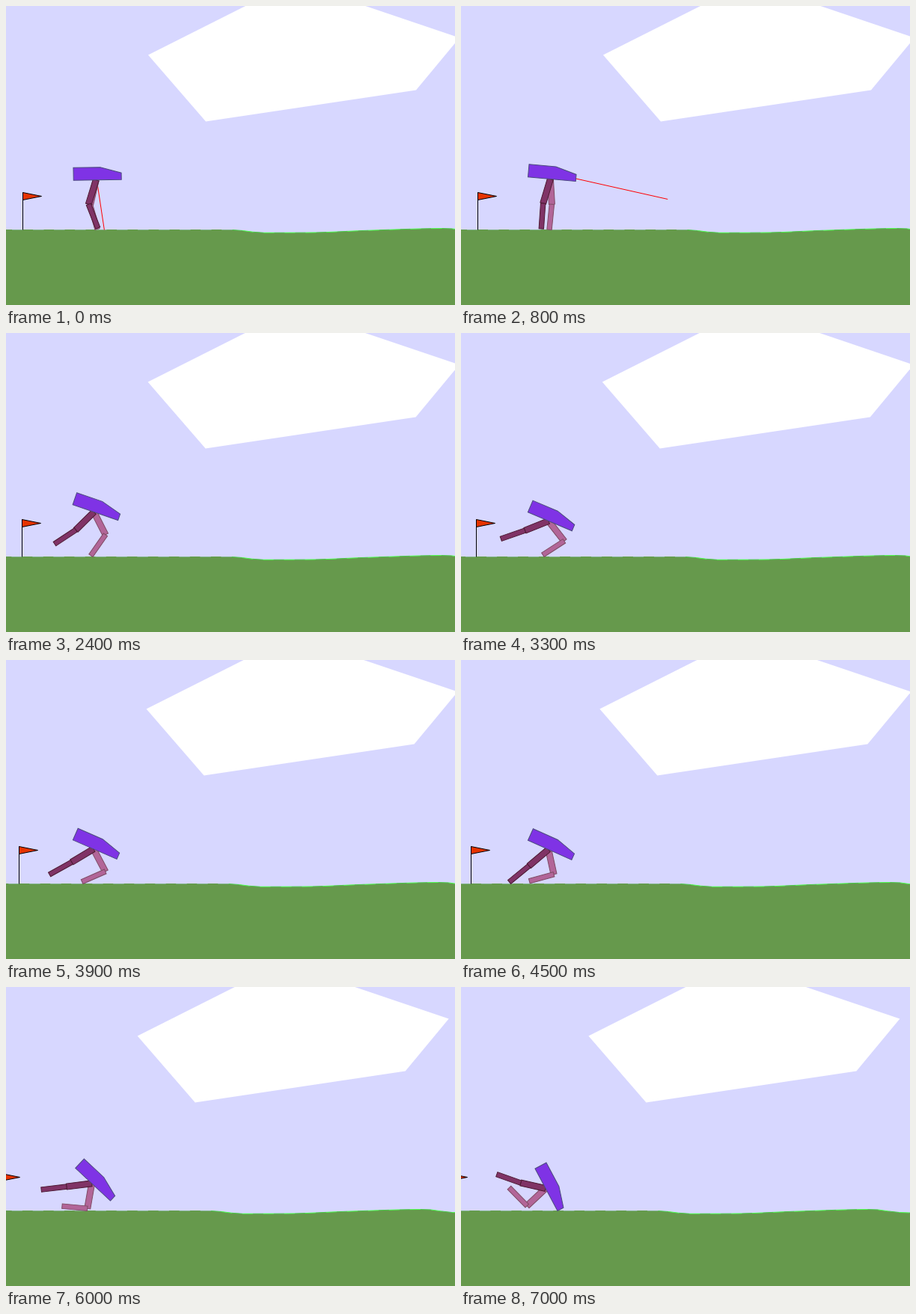
Animation of 600x400 px, one loop 7100 ms. Source, as an HTML page with a canvas:

```html
<!DOCTYPE html>
<html lang="en">
<head>
<meta charset="utf-8">
<title>Biped walker</title>
<style>
html, body { margin: 0; width: 100%; height: 100%; overflow: hidden; background: #d7d7ff; }
canvas { display: block; }
</style>
</head>
<body>
<canvas id="stage" width="600" height="400"></canvas>
<script>
const ctx = document.getElementById('stage').getContext('2d');
const STEP = 100, STEPS = 71, RAD = Math.PI / 180;
const LEG = 34, THIGH_W = 8, SHIN_W = 6.4, HIP = 8;
const HULL_X = 119.6, GROUND = 299, TILE = 14, ROUGH_X = 302;

const hull = [[-30, -9], [6, -9], [34, -1], [34, 8], [-30, 8]];
const cloud = [[189.5, 65], [384, -33], [605.5, 42], [547.5, 112], [266.5, 154]];
const dark = ['rgb(128,51,102)', 'rgb(77,26,51)'];
const light = ['rgb(178,101,152)', 'rgb(127,76,101)'];

// monotone cubic through a few key points
function curve(xs, ys) {
  const last = xs.length - 1;
  const slope = i => (ys[i + 1] - ys[i]) / (xs[i + 1] - xs[i]);
  const tangent = i => {
    if (i === 0) return slope(0);
    if (i === last) return slope(last - 1);
    const a = slope(i - 1), b = slope(i);
    return a * b > 0 ? 2 * a * b / (a + b) : 0;
  };
  return x => {
    if (x <= xs[0]) return ys[0];
    if (x >= xs[last]) return ys[last];
    const i = xs.findIndex(k => k > x) - 1;
    const h = xs[i + 1] - xs[i], u = (x - xs[i]) / h, v = 1 - u;
    return ys[i] * v * v * (1 + 2 * u) + ys[i + 1] * u * u * (3 - 2 * u) +
      h * u * v * (tangent(i) * v - tangent(i + 1) * u);
  };
}

// key angles in degrees; leg angles are measured from straight down
const keys = [0, 15, 24, 33, 45, 60, 70];
const tilt = curve(keys, [-1, 10.6, 19, 23, 24.2, 43, 62]);
const darkThigh = curve(keys, [-17, -16.4, -45.4, -68, -49.8, -82.8, -102.6]);
const darkShin = curve(keys, [21.5, -26.6, -56.5, -71, -50.6, -83.3, -109.5]);
const lightThigh = curve(keys, [-13, 16, 27, 38, 12.3, -9.9, -46.8]);
const lightShin = curve(keys, [16, -22, -35, -57, -74.5, -95.2, -135.6]);

const scrollAt = n => 46 / (1 + Math.exp((56 - n) / 8));
const groundY = curve([288, ROUGH_X, 344, 406, 484, 588, 624, 660],
  [GROUND, GROUND, 302.8, 302.6, 299.7, 297, 301, 302]);

// how far a leg reaches below the hip, at the knee or the foot
function reach(thigh, shin) {
  const knee = LEG * Math.cos(thigh);
  const foot = knee + LEG * Math.cos(shin) + SHIN_W / 2 * Math.abs(Math.sin(shin));
  return Math.max(knee + SHIN_W / 2, foot);
}

// the body hangs so that its lowest part rests on the ground
function hullY(a, legs) {
  const nose = 34 * Math.sin(a) + 8 * Math.cos(a);
  const feet = legs.map(l => HIP * Math.cos(a) + reach(l.thigh, l.shin));
  return GROUND - Math.max(nose, ...feet);
}

function poly(points, fill, stroke) {
  ctx.beginPath();
  for (const [x, y] of points) ctx.lineTo(x, y);
  ctx.closePath();
  ctx.fillStyle = fill;
  ctx.fill();
  if (stroke) {
    ctx.strokeStyle = stroke;
    ctx.stroke();
  }
}

function line(x1, y1, x2, y2, color) {
  ctx.beginPath();
  ctx.moveTo(x1, y1);
  ctx.lineTo(x2, y2);
  ctx.strokeStyle = color;
  ctx.stroke();
}

// draws one leg segment and returns its far end
function bone(x, y, a, width, colors) {
  const w = width / 2;
  ctx.save();
  ctx.translate(x, y);
  ctx.rotate(-a);
  poly([[-w, 0], [w, 0], [w, LEG], [-w, LEG]], ...colors);
  ctx.restore();
  return [x + LEG * Math.sin(a), y + LEG * Math.cos(a)];
}

function drawLeg(hip, { thigh, shin, colors }) {
  const knee = bone(...hip, thigh, THIGH_W, colors);
  bone(...knee, shin, SHIN_W, colors);
}

function drawGround(scroll) {
  const top = [];
  for (let x = ROUGH_X - 23 * TILE; x < 670; x += TILE) top.push([x - scroll, groundY(x)]);
  poly([...top, [700, 410], [-100, 410]], 'rgb(102,153,76)');
  for (let i = 0; i < top.length - 1; i++) {
    const even = i % 2 === 0;
    const color = i < 23 ? (even ? 'rgb(132,180,140)' : 'rgb(100,160,78)')
      : (even ? 'rgb(76,255,76)' : 'rgb(76,204,76)');
    line(...top[i], ...top[i + 1], color);
  }
}

// the sensor beam sweeps out over ten rays and back, then rests
function drawBeam(n, y) {
  const i = n + 1;
  if (i >= 20) return;
  const a = 0.15 * Math.min(i, 19 - i);
  const len = Math.min(160, (GROUND - y) / Math.cos(a));
  line(HULL_X, y, HULL_X + len * Math.sin(a), y + len * Math.cos(a), 'rgb(255,0,0)');
}

function drawFlag(x) {
  line(x, 249, x, GROUND, '#000');
  poly([[x, 249], [x, 259], [x + 25, 254]], 'rgb(230,51,0)', '#000');
}

function draw(n) {
  const scroll = scrollAt(n), a = tilt(n) * RAD;
  const legs = [
    { thigh: lightThigh(n) * RAD, shin: lightShin(n) * RAD, colors: light },
    { thigh: darkThigh(n) * RAD, shin: darkShin(n) * RAD, colors: dark }
  ];
  const y = hullY(a, legs);
  const hip = [HULL_X - HIP * Math.sin(a), y + HIP * Math.cos(a)];

  ctx.setTransform(1, 0, 0, 1, 0, 0);
  ctx.fillStyle = 'rgb(215,215,255)';
  ctx.fillRect(0, 0, 600, 400);
  ctx.translate(0.5, 0.5);
  ctx.lineWidth = 1;

  poly(cloud.map(([px, py]) => [px - scroll / 2, py]), '#fff');
  drawGround(scroll);
  drawBeam(n, y);
  for (const leg of legs) drawLeg(hip, leg);

  ctx.save();
  ctx.translate(HULL_X, y);
  ctx.rotate(a);
  poly(hull, 'rgb(127,51,229)', 'rgb(76,76,127)');
  ctx.restore();

  drawFlag(22 - Math.round(scroll));
}

function tick() {
  draw(Math.floor(performance.now() / STEP) % STEPS);
  requestAnimationFrame(tick);
}
tick();
</script>
</body>
</html>
```
